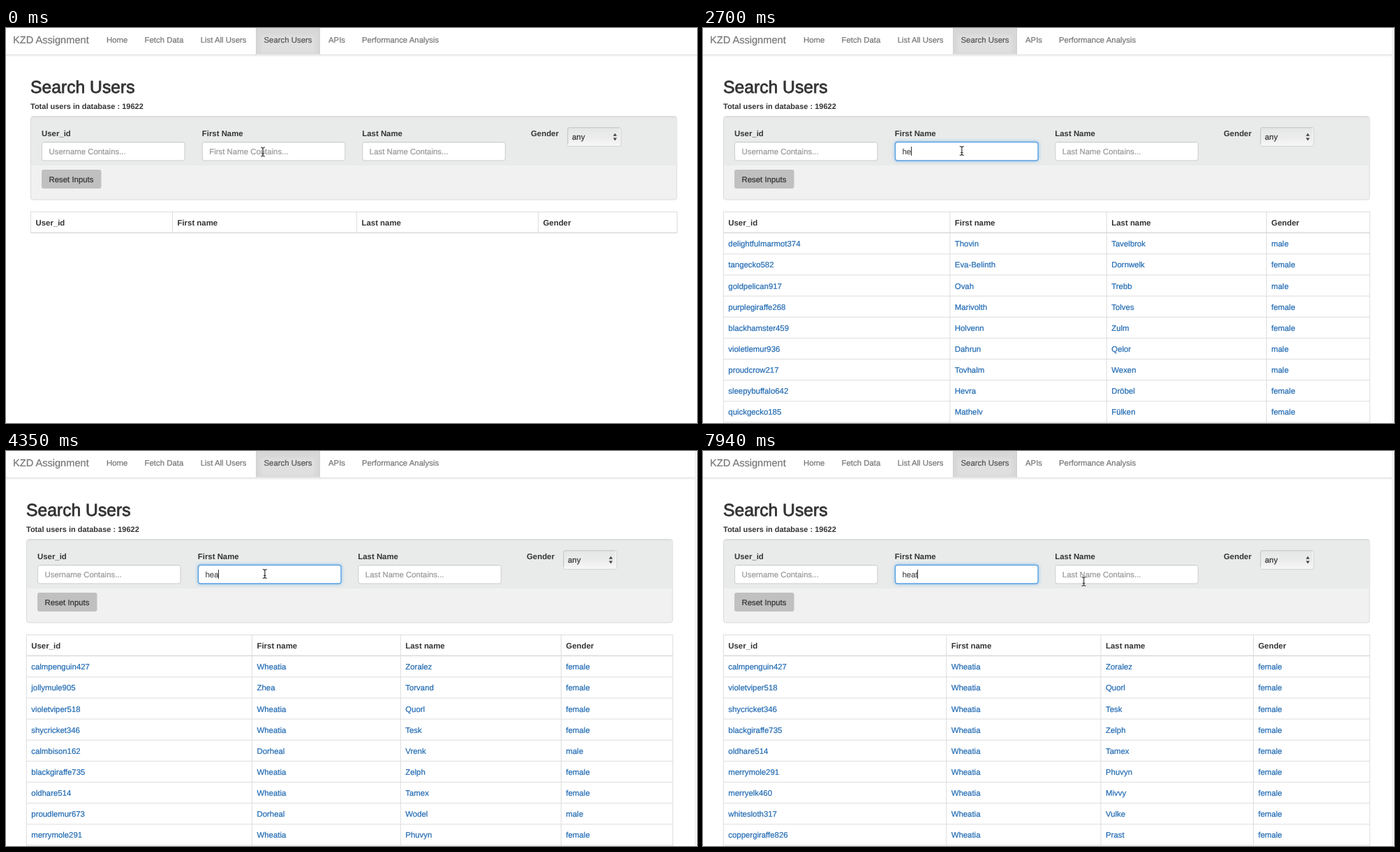
These frames come from a looping animation (990 px wide and 566 px high, 8 s). An HTML page:

```html
<!DOCTYPE html>
<html lang="en">
<head>
<meta charset="utf-8">
<title>Search Users</title>
<style>
html, body { margin: 0; width: 100%; height: 100%; overflow: hidden; background: #fff; }
svg { display: block; width: 990px; height: 566px; }
text {
  font: 11.4px "Liberation Sans", Arial, sans-serif; white-space: pre; text-rendering: geometricPrecision;
  color: #333; fill: currentColor; stroke: currentColor; stroke-width: .22px;
}
.bold { font-weight: bold; stroke: none; }
.total { font-size: 11px; }
.title { font-size: 24.7px; stroke-width: .8px; }
.brand { font-size: 14.6px; color: #777; }
.nav { color: #777; }
.active, .typed { color: #555; }
.hint { color: #999; }
.link { color: #226bb3; }
.rule { fill: none; stroke: #ddd; }
.field { fill: #fff; stroke: #ccc; }
.focus { fill: #fff; stroke: #5da3e3; stroke-width: 1.4px; filter: drop-shadow(0 0 2.5px rgba(102, 175, 233, .75)); }
</style>
</head>
<body>
<svg id="stage" viewBox="0 0 990 566" xmlns="http://www.w3.org/2000/svg"></svg>
<script>
const LOOP = 8000;
const css = [];

// Stepped CSS animation from [ms, value] pairs; returns its class name.
function track(name, property, points) {
  const frames = points.map(([ms, value]) => `${ms / LOOP * 100}%{${property}:${value}}`).join('');
  css.push(`@keyframes ${name}{${frames}} .${name}{animation:${name} ${LOOP}ms step-end infinite}`);
  return name;
}
const shown = (name, from, to) => track(name, 'opacity', [[0, 0], [from, 1], [to, 0]]);
const moved = (name, points) =>
  track(name, 'transform', points.map(([ms, x, y]) => [ms, `translate(${x}px,${y}px)`]));

const text = (x, y, label, cls = '') => `<text x="${x}" y="${y}" class="${cls}">${label}</text>`;
const box = (x, y, w, h, attrs) => `<rect x="${x}" y="${y}" width="${w}" height="${h}" ${attrs}/>`;
const group = (cls, ...parts) => `<g class="${cls}">${parts.join('')}</g>`;

const broad = [
  'delightfulmarmot374 Thovin Tavelbrok male', 'tangecko582 Eva-Belinth Dornwelk female',
  'goldpelican917 Ovah Trebb male', 'purplegiraffe268 Marivolth Tolves female',
  'blackhamster459 Holvenn Zulm female', 'violetlemur936 Dahrun Qelor male',
  'proudcrow217 Tovhalm Wexen male', 'sleepybuffalo642 Hevra Dröbel female',
  'quickgecko185 Mathelv Fülken female'
];
const narrower = [
  ...broad.slice(-2),
  'shymole329 Hevorianda Tarvoza female', 'purplesloth753 Helvon Tovig male',
  'crimsonpelican416 Zhelyn Brenk female', 'blackfrog840 Morthe Vuun female',
  'oldlemur571 Vashel Quorl female', 'violetcamel694 Helm-Töbrund Dornwalkbach male',
  'jollymule238 Tolhem Vondrisma male'
];
const close = [
  'calmpenguin427 Wheatia Zoralez female', 'jollymule905 Zhea Torvand female',
  'violetviper518 Wheatia Quorl female', 'shycricket346 Wheatia Tesk female',
  'calmbison162 Dorheal Vrenk male', 'blackgiraffe735 Wheatia Zelph female',
  'oldhare514 Wheatia Tamex female', 'proudlemur673 Dorheal Wodel male',
  'merrymole291 Wheatia Phuvyn female'
];
const exact = [
  ...close.filter(row => row.includes('Wheatia')),
  'merryelk460 Wheatia Mivvy female', 'whitesloth317 Wheatia Vulke female',
  'coppergiraffe826 Wheatia Prast female'
];

function table(left, columns, rows, cls) {
  const starts = [left, ...columns];
  const right = left + 926;
  const bottom = rows.length ? 567 : 293.5;
  const cells = (labels, y, style) => labels.map((label, i) => text(starts[i] + 7, y, label, style)).join('');
  const verticals = [...starts, right].map(x => `M${x} 263V${bottom}`).join('');
  const lines = rows.map((_, i) => `M${left} ${323.8 + 30.15 * i}H${right}`).join('');
  return group(cls,
    `<path class="rule" d="M${left} 263.5H${right}${verticals}${lines}"/>`,
    `<path class="rule" stroke-width="1.6" d="M${left} 293.4H${right}"/>`,
    cells(['User_id', 'First name', 'Last name', 'Gender'], 282.7, 'bold'),
    rows.map((row, i) => cells(row.split(' '), 313.2 + 30.15 * i, 'link')).join(''));
}

const navbar =
  box(-2, -5, 994, 43.2, 'fill="#fff" stroke="#e2e2e2" filter="url(#soft)"') +
  box(358, -1, 92, 38.5, 'fill="#d7d7d7"') +
  box(365, 10, 78, 26, 'rx="3" fill="#dfdfdf" filter="url(#blur)"') +
  '<path d="M358.5 0V37.5M449.5 0V37.5" stroke="#cfcfcf"/>' +
  text(10, 22, 'KZD Assignment', 'brand') +
  [[144, 'Home'], [198.5, 'Fetch Data'], [278.7, 'List All Users'], [462, 'APIs'], [510, 'Performance Analysis']]
    .map(([x, label]) => text(x, 21, label, 'nav')).join('') +
  text(369.5, 21, 'Search Users', 'active');

const field = (x, label, hint) =>
  text(x, 154.7, label, 'bold') +
  box(x + .5, 163.5, 204.5, 26.5, 'rx="3" class="field"') +
  `<path d="M${x + 2} 164.5h201.5" stroke="#f1f1f1"/>` +
  text(x + 10.5, 180.7, hint, 'hint');

const select =
  text(752, 154.7, 'Gender', 'bold') +
  box(804.5, 142.5, 76.5, 27, 'rx="3" fill="#f6f6f6" stroke="#d2d2d2"') +
  box(805.5, 143.5, 73.5, 24, 'rx="3" fill="url(#menu)"') +
  '<path d="M805 166V145q0-2 2-2H879" fill="none" stroke="#c6c8c7"/>' +
  text(811, 160.2, 'any') +
  '<path d="M869.8 154.8l2.7-4 2.7 4zM869.8 157.4l2.7 4 2.7-4z" fill="#444"/>';

const well =
  box(35.5, 126.5, 925.5, 119.5, 'rx="3.3" fill="#f1f1f1" stroke="#d9dad9"') +
  box(36, 127, 924.5, 70, 'rx="3" fill="#e9ebea"') +
  '<path d="M37 127.7H960" stroke="#e0e2e1" stroke-width="1.5"/>';

const queries = [['h', 1350, 2700], ['he', 2700, 4050], ['hea', 4050, 5850], ['heat', 5850, LOOP]]
  .map(([word, from, to]) => text(291.5, 180.7, word, 'typed ' + shown('type-' + word, from, to))).join('');

const focus = box(281.5, 163.5, 204.5, 26.5, 'rx="3" class="focus ' +
  track('glow', 'opacity', [[0, 0], [300, .5], [450, 1]]) + '"');

const blink = track('blink', 'opacity', [
  [0, 0], [450, 1], [1200, 0], [1350, 1], [1800, 0], [2400, 1], [3150, 0], [3600, 1],
  [4650, 0], [5100, 1], [5550, 0], [5850, 1], [6450, 0], [6900, 1], [7350, 0], [7800, 1]
]);
const caretMove = moved('caret', [[0, 291, 170], [1350, 298, 170], [2700, 304, 170], [4050, 310, 170], [5850, 313, 170]]);
const caret = group(caretMove, box(0, 0, 1, 13, `class="${blink}" fill="#333"`));

const form = group(moved('reflow', [[0, 0, 0], [1500, -6, 0]]),
  text(35, 93, 'Search Users', 'title'),
  text(35, 116.3, 'Total users in database : 19622', 'bold total'),
  well,
  field(51, 'User_id', 'Username Contains...'),
  field(280.8, 'First Name', ''),
  field(510.3, 'Last Name', 'Last Name Contains...'),
  focus,
  group(shown('prompt', 0, 1350), text(291.3, 180.7, 'First Name Contains...', 'hint')),
  queries, caret, select,
  box(51, 203, 85.5, 27, 'rx="3" fill="#c0c0c0"'),
  text(61.5, 220.5, 'Reset Inputs'));

const scrollbar = group(shown('scrollbar', 1500, LOOP),
  box(987.5, 0, 3, 566, 'fill="#fbfbfb"'),
  '<path d="M987.7 0V566" stroke="#e6e6e6"/>');

const beam = 'M-3-6.3H-2Q0-6.3 0-4.5Q0-6.3 2-6.3H3M0-4.5V4.5M-3 6.3H-2Q0 6.3 0 4.5Q0 6.3 2 6.3H3M-1.5 2.5H1.5';
const pointer = group(moved('pointer', [
  [0, 368, 177.5], [150, 369, 177], [600, 370.7, 176], [6900, 370.7, 177],
  [7500, 378, 178], [7650, 432, 183], [7800, 512, 187], [7940, 545.5, 187]
]),
  `<path d="${beam}" fill="none" stroke="#fff" stroke-width="2.6"/>`,
  `<path d="${beam}" fill="none" stroke="#111" stroke-width="1.1"/>`);

const defs = `<defs>
  <linearGradient id="menu" x2="0" y2="1"><stop stop-color="#e5e7e6"/><stop offset=".6" stop-color="#ecedec"/><stop offset="1" stop-color="#f6f6f6"/></linearGradient>
  <filter id="soft"><feDropShadow dx="0" dy=".8" stdDeviation="1" flood-opacity=".12"/></filter>
  <filter id="blur"><feGaussianBlur stdDeviation="2"/></filter>
</defs>`;

document.getElementById('stage').innerHTML = defs + form +
  table(35.5, [238.5, 502.5, 762.5], [], shown('empty', 0, 1500)) +
  table(29.3, [353.8, 578.3, 807.3], broad, shown('broad', 1500, 2850)) +
  table(29.3, [342, 569.5, 805.3], narrower, shown('narrower', 2850, 4350)) +
  table(29.3, [352.5, 565.3, 795.3], close, shown('close', 4350, 6000)) +
  table(29.3, [348.7, 570, 788.5], exact, shown('exact', 6000, LOOP)) +
  navbar + scrollbar + pointer;
document.head.appendChild(document.createElement('style')).textContent = css.join('\n');
</script>
</body>
</html>
```
